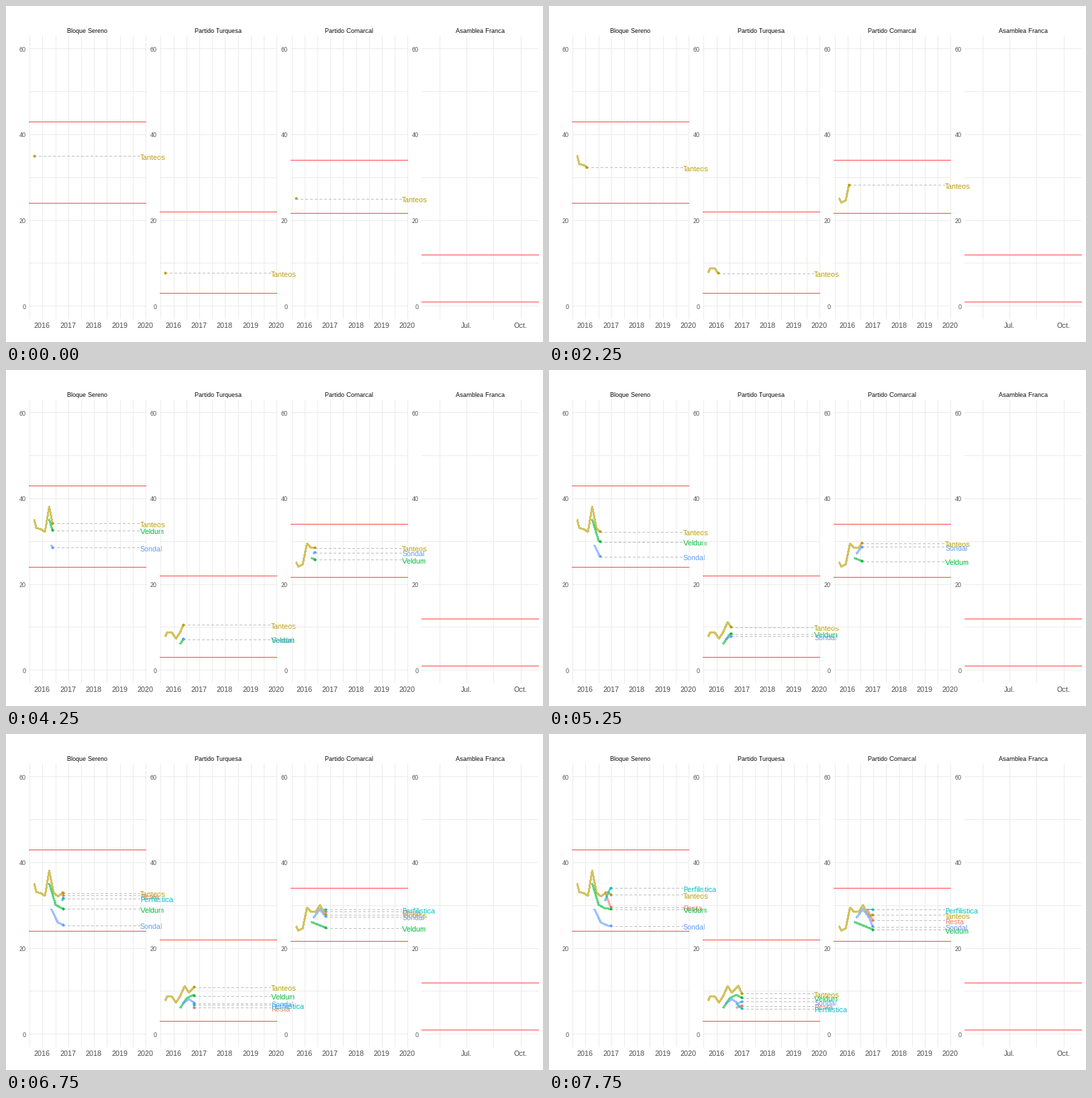
Recreate the animation shown at these times as a matplotlib script. Size 800 px wide and 500 px high, loop 8 s.

```python
import numpy as np
import matplotlib.pyplot as plt
from matplotlib.animation import FuncAnimation

W, H, DPI = 800, 500, 100
FRAMES, INTERVAL = 32, 250
PX = 72 / DPI

plt.rcParams["font.family"] = "Liberation Sans"
plt.rcParams["text.hinting"] = "native"
plt.rcParams["text.hinting_factor"] = 1

GRID, TICK, RED = "#ebebeb", "#4d4d4d", "#ff4444"
STEP = 195.22         # distance between panels
TOP, BOTTOM = 43.5, 465
YEAR = 38.42
SNAP = 0.5            # makes level lines land on the right pixel row

# title and the two horizontal limits of each panel
PANELS = [
    ("Bloque Sereno", (43, 24)),
    ("Partido Turquesa", (22, 3)),
    ("Partido Comarcal", (34, 21.65)),
    ("Asamblea Franca", (12, 1)),
]


def swing(m):
    """Half-yearly wave in the polls."""
    return np.cos(np.pi * (m - 2) / 3)


def late(m):
    return np.maximum(m - 11, 0) ** 2


def every(first, gap=3):
    return np.arange(first, 18, gap)


# name, colour, months polled, trend in each panel
# (trends take months since the start, or since the first poll as t)
POLLS = [
    ("Resta", "#f8766d", every(13), [
        lambda t: 33 - 1.4 * t,
        lambda t: 6 + 0.2 * t,
        lambda t: 29 - t]),
    ("Tanteos", "#b79f00", np.r_[0, 1:12:2, 14, 16], [
        lambda m: (32.5 + 0.5 * swing(m) + 5.2 * np.exp(-(m - 7.0) ** 2)
                   + 2.7 * np.exp(-2.5 * m)),
        lambda m: 9.4 + 1.2 * np.tanh(2 * (m - 8)) + swing(m) - 0.05 * late(m),
        lambda m: 26.7 + 2.2 * np.tanh(m - 4) - swing(m) - 0.06 * late(m)]),
    ("Veldum", "#00ba38", every(7), [
        lambda t: 29 + 6 * np.exp(-0.6 * t),
        lambda t: 9 - 3 * (t / 6 - 1) ** 2,
        lambda t: 26 - 0.2 * t]),
    ("Perfilistica", "#00bfc4", every(13), [
        lambda t: 31 + 1.2 * t,
        lambda t: 7 - 0.45 * t,
        lambda t: 29 + 0 * t]),
    ("Sondal", "#619cff", every(8), [
        lambda t: 25 + 4 * np.exp(-0.5 * t),
        lambda t: 7.5 - 0.5 * np.cos(np.pi * t / 3),
        lambda t: 29 - 2 * np.abs(t / 3 - 1) ** 1.58]),
]

fig = plt.figure(figsize=(W / DPI, H / DPI), dpi=DPI, facecolor="white")
ax = fig.add_axes([0, 0, 1, 1])
ax.set_xlim(0, W)
ax.set_ylim(H, 0)
ax.axis("off")


def ypos(v):
    return 445.75 - 6.383 * v


def xpos(month, panel):
    return 42 + YEAR / 12 * np.asarray(month) + STEP * panel


def line(x, y, color, z, width=1.0, **kw):
    return ax.plot(x, y, color=color, lw=width * PX, zorder=z, **kw)[0]


def level(left, right, v, color, z):
    line([left, right], [ypos(v) + SNAP] * 2, color, z)


def text(x, y, s, px, color, z, ha="center"):
    return ax.text(x, y, s, fontsize=px * PX, color=color, ha=ha,
                   va="baseline", zorder=z)


def draw_panel(i, title, limits):
    z = 10 * i
    left = 34.2 + 195 * i
    right = left + 174
    for v in range(0, 61, 10):
        level(left, right, v, GRID, z)
        if v % 20 == 0:
            text(left - 4.6, round(ypos(v) + 4.9), str(v), 9.4, TICK, z, "right")
    if i < 3:
        marks = 54.3 + STEP * i + YEAR / 2 * np.arange(-1, 9)
        names = {2 * k + 1: str(2016 + k) for k in range(5)}
    else:
        marks = 646 + 40.2 * np.arange(4)
        names = {1: "Jul.", 3: "Oct."}
    for k, x in enumerate(marks):
        line([x, x], [TOP, BOTTOM], GRID, z)
        if k in names:
            text(x - 0.5, 479, names[k], 10.7, TICK, z)
    for v in limits:
        level(left, right, v, RED, z + 1)
    text((left + right) / 2, 40, title, 9.3, "black", z)


class Track:
    """One pollster inside one panel."""

    def __init__(self, name, color, months, trend, panel):
        self.months, self.panel = months, panel
        self.values = trend(months - months[0])
        z = 10 * panel
        self.path = line([], [], color, z + 2, 2, alpha=0.62,
                         solid_capstyle="butt", antialiased=False)
        self.lead = line([], [], "#bebebe", z + 3, dashes=(4, 4),
                         antialiased=False)
        self.dot = line([], [], color, z + 4, marker="o",
                        markersize=4 * PX, markeredgewidth=0)
        self.label = text(199.8 + STEP * panel, 0, name, 10.7, color,
                          z + 5, "left")
        self.parts = [self.path, self.lead, self.dot, self.label]

    def show(self, now):
        for part in self.parts:
            part.set_visible(now >= self.months[0])
        past = np.append(self.months[self.months < now], now)
        x = xpos(past, self.panel)
        y = ypos(np.interp(past, self.months, self.values))
        self.path.set_data(x, y)
        self.lead.set_data([x[-1], 199 + STEP * self.panel], [y[-1] + SNAP] * 2)
        self.dot.set_data(x[-1:], y[-1:])
        self.label.set_y(round(y[-1] + 6))


for i, (title, limits) in enumerate(PANELS):
    draw_panel(i, title, limits)

tracks = [Track(name, color, months, trend, panel)
          for name, color, months, trends in POLLS
          for panel, trend in enumerate(trends)]


def update(frame):
    for track in tracks:
        track.show(frame / 2)     # half a month per frame
    return []


anim = FuncAnimation(fig, update, frames=FRAMES, interval=INTERVAL,
                     repeat=True, repeat_delay=0, blit=False)
plt.show()
```
